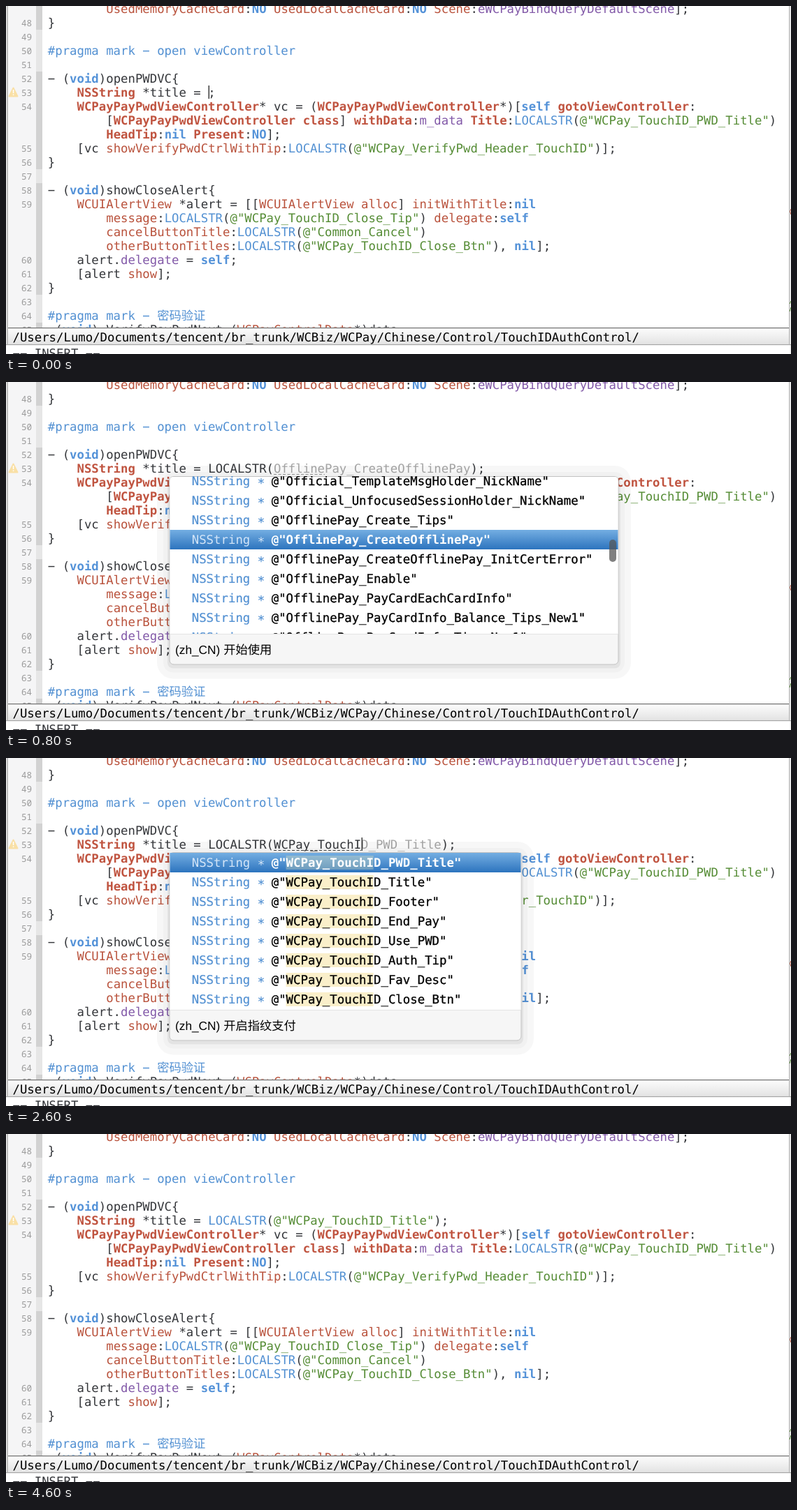
An HTML page that plays this animation: 1123 px wide and 499 px high, repeating every 4.8 s.

```html
<!DOCTYPE html>
<html lang="en">
<head>
<meta charset="utf-8">
<title>Code completion</title>
<style>
html, body { margin: 0; width: 100%; height: 100%; overflow: hidden; background: #fff; }
svg { display: block; width: 100vw; height: 100vh; }
text { font: 17.32px "DejaVu Sans Mono", "Noto Sans CJK SC", monospace; white-space: pre; text-rendering: geometricPrecision; }
.d { fill: #34363a; }
.o { fill: #b9523c; }
.O { fill: #c05440; font-weight: bold; }
.b { fill: #5290d2; }
.B { fill: #5492d8; font-weight: bold; }
.p { fill: #8259a8; }
.g { fill: #558c35; }
.h { fill: #a6a6a6; }
.k { fill: #000; }
.w { fill: #fff; font-weight: bold; }
.l { fill: #d3e5f8; }
.list text { font-size: 17.37px; }
.list .k { stroke: #000; stroke-width: .3; }
.list .b { stroke: #5290d2; stroke-width: .2; }
text.n { font: 12.6px "Noto Sans Mono", monospace; fill: #9a9a9a; text-anchor: end; }
text.f { font: 17.3px "Liberation Sans", "Noto Sans CJK SC", sans-serif; }
.list text.i { font: bold 14px "DejaVu Sans Mono", monospace; fill: #fff; text-anchor: middle; }
.end { text-anchor: end; }
</style>
</head>
<body>
<svg id="stage" viewBox="0 0 1123 499" preserveAspectRatio="none">
  <defs>
    <linearGradient id="blue" x2="0" y2="1"><stop stop-color="#74aee2"/><stop offset="1" stop-color="#2d74be"/></linearGradient>
    <linearGradient id="bar" x2="0" y2="1"><stop stop-color="#fdfdfd"/><stop offset="1" stop-color="#e2e2e2"/></linearGradient>
    <clipPath id="editor"><rect width="1120" height="461"/></clipPath>
    <clipPath id="list"><rect x="77" y="135" width="800" height="226"/></clipPath>
  </defs>
  <rect width="1123" height="499" fill="#fff"/>
  <g id="base"></g>
  <g id="live"></g>
</svg>
<script>
const LOOP = 4800, STEP = 200, LEFT = 59.8, CELL = 17.32 * 1233 / 2048;
const base = document.getElementById('base'), live = document.getElementById('live');

const esc = s => s.replace(/&/g, '&amp;').replace(/</g, '&lt;');
const col = c => LEFT + c * CELL;
const rect = (x, y, w, h, fill, more = '') =>
  `<rect x="${x}" y="${y}" width="${w}" height="${h}" fill="${fill}" ${more}/>`;
const text = (x, y, cls, s) => `<text x="${x}" y="${y}" class="${cls}">${esc(s)}</text>`;

// Marked-up code: "plain|class|styled|class|styled..."
function code(y, src, c = 0) {
  const parts = ('d|' + src).split('|');
  let out = '';
  for (let i = 0; i < parts.length; i += 2) {
    out += `<tspan class="${parts[i]}">${esc(parts[i + 1])}</tspan>`;
  }
  return `<text x="${col(c)}" y="${y}">${out}</text>`;
}

// [line number, indent, code]
const lines = [
  ['', 8, '|o|UsedMemoryCacheCard|d|:|B|NO |o|UsedLocalCacheCard|d|:|B|NO |o|Scene|d|:|p|eWCPayBindQueryDefaultScene|d|];'],
  [48, 0, '}'],
  [49, 0, ''],
  [50, 0, '|b|#pragma mark − open viewController'],
  [51, 0, ''],
  [52, 0, '− (|B|void|d|)openPWDVC{'],
  [53, 4, '|O|NSString|d| *title = '],
  [54, 4, '|O|WCPayPayPwdViewController|d|* vc = (|O|WCPayPayPwdViewController|d|*)[|B|self |O|gotoViewController|d|:'],
  ['', 8, '[|O|WCPayPayPwdViewController class|d|] |O|withData|d|:|p|m_data |O|Title|d|:|b|LOCALSTR|d|(|g|@"WCPay_TouchID_PWD_Title"|d|)'],
  ['', 8, '|O|HeadTip|d|:|B|nil |O|Present|d|:|B|NO|d|];'],
  [55, 4, '[vc |o|showVerifyPwdCtrlWithTip|d|:|b|LOCALSTR|d|(|g|@"WCPay_VerifyPwd_Header_TouchID"|d|)];'],
  [56, 0, '}'],
  [57, 0, ''],
  [58, 0, '− (|B|void|d|)showCloseAlert{'],
  [59, 4, '|o|WCUIAlertView|d| *alert = [[|o|WCUIAlertView alloc|d|] |o|initWithTitle|d|:|B|nil'],
  ['', 8, '|o|message|d|:|b|LOCALSTR|d|(|g|@"WCPay_TouchID_Close_Tip"|d|) |o|delegate|d|:|B|self'],
  ['', 8, '|o|cancelButtonTitle|d|:|b|LOCALSTR|d|(|g|@"Common_Cancel"|d|)'],
  ['', 8, '|o|otherButtonTitles|d|:|b|LOCALSTR|d|(|g|@"WCPay_TouchID_Close_Btn"|d|), |B|nil|d|];'],
  [60, 4, 'alert.|p|delegate|d| = |B|self|d|;'],
  [61, 4, '[alert |o|show|d|];'],
  [62, 0, '}'],
  [63, 0, ''],
  [64, 0, '|b|#pragma mark − 密码验证'],
  [65, 0, '−(|B|void|d|) VerifyPayPwdNext:(|o|WCPayControlData|d|*)data']
];

function drawBase() {
  let s = rect(0, 0, 3, 486, '#f0f0f0') + rect(1, 0, 2, 486, '#bdbdbd') + rect(3, 0, 40, 461, '#f5f5f6') + rect(43, 0, 9, 461, '#e6e6e6');
  for (const [y, h] of [[0, 34], [94, 140], [254, 160], [454, 7]]) s += rect(43, y, 9, h, '#d2d2d2');
  s += '<g clip-path="url(#editor)">';
  lines.forEach(([num, indent, src], i) => {
    const y = 10 + 20 * i;
    s += text(37, y - 1.5, 'n', String(num)) + code(y, src, indent);
  });
  s += '</g><path d="M10.5 117.5L16.5 129.5H4.5Z" fill="#f9e0a6" stroke="#f9e0a6" stroke-width="2" stroke-linejoin="round"/>' +
    rect(9.8, 120, 1.5, 5, '#fff') + rect(9.8, 126.5, 1.5, 1.5, '#fff');
  s += rect(1120, 0, 1.5, 486, '#b5b5b5') + rect(1121.5, 0, 1.5, 499, '#f0f0f0') +
    '<path d="M1123 291q-3 3 0 8" fill="none" stroke="#b9523c"/><path d="M1123 423l-2 4m2 5l-2 6" fill="none" stroke="#558c35"/>';
  s += rect(3, 461, 1117, 25, 'url(#bar)') + rect(3, 461, 1117, 1.3, '#777') + rect(0, 485, 1123, 1.2, '#a5a5a5');
  s += text(9.5, 481, 'k', '/Users/Lumo/Documents/tencent/br_trunk/WCBiz/WCPay/Chinese/Control/TouchIDAuthControl/');
  s += text(9.5, 503.5, 'd', '−− INSERT −−');
  base.innerHTML = s;
}

const macros = {
  x: 77, w: 620, nameX: 286.5,
  rows: ['LSTR(key)', 'TION_ERROR', 'TION_SUCCESS', 'TION_ERROR_FAILED', 'TION_ERROR_NOT_AUTHORIZED', 'L_USR_PIC', 'L_USR_HDPIC', 'L_SUBUSER_PIC'].map(s => 'LOCA' + s),
  icons: '#EKKK###'
};
const strings = (w, names, more) => ({
  x: 234, w, nameX: 379.7, quoted: true, rows: names.map(s => `@"${s}"`), ...more
});
const offline = strings(642, ['Official_TemplateMsgHolder_NickName', 'Official_UnfocusedSessionHolder_NickName',
  'OfflinePay_Create_Tips', 'OfflinePay_CreateOfflinePay', 'OfflinePay_CreateOfflinePay_InitCertError', 'OfflinePay_Enable',
  'OfflinePay_PayCardEachCardInfo', 'OfflinePay_PayCardInfo_Balance_Tips_New1', 'OfflinePay_PayCardInfo_Tips_New1'],
  { shift: -8, thumb: 226 });
const wcAny = strings(503, ['WCPay_TouchID_PWD_Title', 'WCPay_Add', 'WCBiz_Next', 'WCGroup_New', 'WCPay_Title',
  'WC_Full_Text', 'WCCard_Title', 'WCCard_Ticket']);
const touch = strings(503, ['PWD_Title', 'Title', 'Footer', 'End_Pay', 'Use_PWD', 'Auth_Tip', 'Fav_Desc', 'Close_Btn']
  .map(s => 'WCPay_TouchID_' + s));
const iconFill = { '#': '#cf7468', E: '#e9a56c', K: '#4d8c6b' };

function popup(p, matched, sel, note) {
  const { x, w, nameX, rows, icons, quoted, shift = 0, thumb } = p;
  const h = note ? 269.5 : 225;
  const shade = (m, alpha) => rect(x - m, 138 - m, w + 2 * m, h + 2 * m, '#000', `rx="${m + 5}" opacity="${alpha}"`);
  let s = shade(18, .03) + shade(9, .025) + shade(3, .06) +
    rect(x, 135.5, w, h, note ? '#f6f6f6' : '#fff', 'rx="6" stroke="#c2c2c2"');
  if (note) s += `<path d="M${x + .5} 361V141q0-5 5-5h${w - 11}q5 0 5 5v220z" fill="#fff"/>`;
  s += '<g class="list" clip-path="url(#list)">';
  rows.forEach((name, i) => {
    const top = 136 + 28 * i + shift, y = top + 19.8, on = i === sel;
    if (on) s += rect(x + .5, top, w - 1, 28, 'url(#blue)');
    if (matched) {
      const mx = nameX + (quoted ? 2 * CELL : 0), mw = matched * CELL;
      s += rect(mx, top + 4, mw, 20, on ? '#fff0b0' : '#faefca', on ? 'opacity=".28"' : '');
      if (matched < 5) s += rect(mx, top + 22, mw, 2, '#e5c458');
    }
    if (icons) {
      s += rect(83.5, top + 6.5, 17, 17, iconFill[icons[i]], 'rx="2" stroke="#e4c4bc"') + text(92, top + 20, 'i', icons[i]);
      if (icons[i] === 'K') s += text(279, y, 'b end', 'LOCATION_ERROR');
    } else {
      s += `<text x="265.7" y="${y}" class="${on ? 'l' : 'b'}">NSString <tspan dy="3">*</tspan></text>`;
    }
    s += text(nameX, y, on ? 'w' : 'k', name);
  });
  s += '</g>';
  if (thumb) s += rect(863, thumb, 10, 32, '#555', 'rx="5" opacity=".75"');
  if (note) s += rect(x + .5, 361, w - 1, 1, '#e4e4e4') + text(242, 389.5, 'k f', note);
  return s;
}

const caret = c => rect(col(c) + .4, 114, 1.3, 19, '#222');

function macroStep(typed) {
  return code(130, `${typed}|h|${'LOCALSTR(key)'.slice(typed.length)}|d|;`, 22) +
    popup(macros, typed.length, 0) + caret(22 + typed.length);
}

function stringStep(list, full, typed, sel, note, blink = true) {
  const n = typed.length, ul = n || 7;
  return code(130, `LOCALSTR(${typed}|h|${full.slice(n)}|d|);`, 22) +
    `<path d="M${col(31)} 132.5H${col(31 + ul)}" stroke="${n ? '#444' : '#999'}" stroke-dasharray="4 2.5"/>` +
    popup(list, n, sel, note) + (blink ? caret(31 + n) : '');
}

// Typed length of the key, one entry per step from 1000 ms
const typing = [1, 1, 2, 3, 4, 5, 7, 9, 12, 13, 13, 13];
const key = 'WCPay_TouchID_PWD_Title';

function draw(t) {
  const step = Math.floor(t / STEP);
  if (step === 0) return code(130, ';', 22) + caret(22);
  if (step === 1) return code(130, 'L;', 22) + caret(23);
  if (step < 4) return macroStep('LOCA'.slice(0, step + 1));
  if (step === 4) return stringStep(offline, 'OfflinePay_CreateOfflinePay', '', 3, '(zh_CN) 开始使用', false);
  if (step < 17) {
    const n = typing[step - 5];
    return stringStep(n < 3 ? wcAny : touch, key, key.slice(0, n), 0, '(zh_CN) 开启指纹支付', step < 15);
  }
  if (step === 17) return stringStep(touch, 'WCPay_TouchID_Title', 'WCPay_TouchID', 1, '(zh_CN) TouchID支付', false);
  return code(130, '|b|LOCALSTR|d|(|g|@"WCPay_TouchID_Title"|d|);', 22) + (step < 20 ? caret(53) : '');
}

let shown = -1;
function tick() {
  const t = performance.now() % LOOP, step = Math.floor(t / STEP);
  if (step !== shown) {
    shown = step;
    live.innerHTML = draw(t);
  }
  requestAnimationFrame(tick);
}
drawBase();
tick();
</script>
</body>
</html>
```
